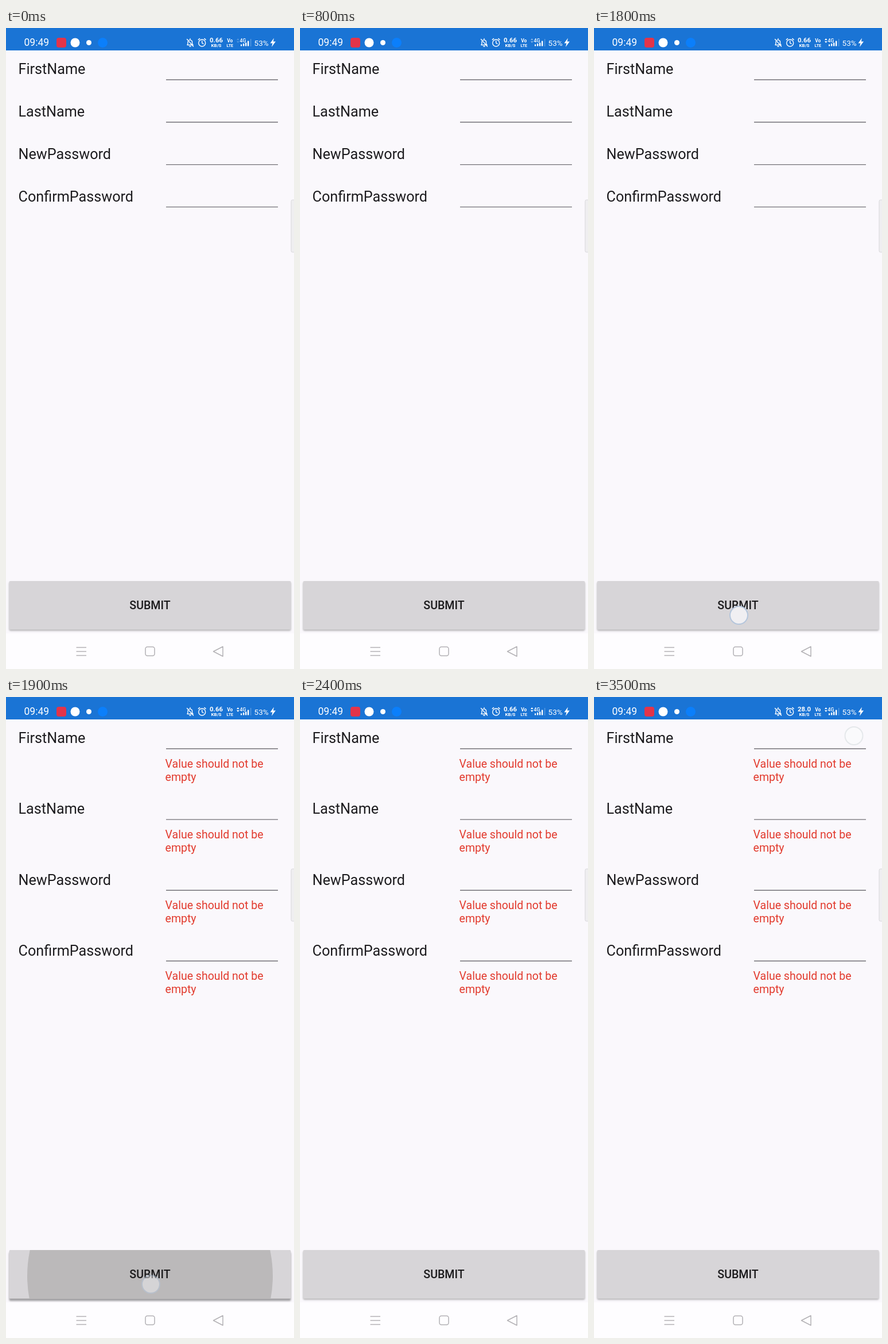
Animation of 502x1115 px, one loop 3.6 s. Source, as an HTML page:

```html
<!DOCTYPE html>
<html lang="en">
<head>
<meta charset="utf-8">
<title>Form validation</title>
<style>
  html, body { margin: 0; width: 100%; height: 100%; overflow: hidden; background: #faf8fc; }
  svg { display: block; width: 502px; height: 1115px; font-family: Roboto, "Noto Sans", sans-serif; }
  .label { font-size: 25.2px; fill: #1d1c1f; }
  .error { font-size: 19.5px; fill: #e23b2e; }
  .line { stroke: #727176; stroke-width: 1.4; }
  .white { fill: #fff; }
  .bold { font-weight: 700; text-anchor: middle; }
  .icon { fill: none; stroke: #fff; stroke-width: 1.4; stroke-linecap: round; stroke-linejoin: round; }
  .nav { fill: none; stroke: #b3b1b5; stroke-width: 1.5; stroke-linejoin: round; }
</style>
</head>
<body>
<svg viewBox="0 0 502 1115">
  <defs>
    <clipPath id="buttonClip"><rect x="5.5" y="962" width="491" height="84.5" rx="2"/></clipPath>
    <filter id="blur" x="-5%" y="-20%" width="110%" height="140%"><feGaussianBlur stdDeviation="1.8"/></filter>
  </defs>
  <rect width="502" height="1115" fill="#faf8fc"/>
  <rect y="1053" width="502" height="62" fill="#fefdff"/>

  <!-- status bar -->
  <rect width="502" height="39" fill="#1a74d5"/>
  <g class="white">
    <text x="31.5" y="31" font-size="17.5">09:49</text>
    <rect x="88" y="17" width="17" height="17" rx="4" fill="#e3344a"/>
    <circle cx="120.5" cy="25.5" r="8"/>
    <circle cx="144.5" cy="25.5" r="4.5"/>
    <circle cx="168.5" cy="25.5" r="8.5" fill="#0b7ffb"/>
    <g class="icon">
      <path d="M316 29.5h10l-1.5-2.5v-3.5a4 4 0 0 0-7.5 0V27zM319.8 32h2.4M321 18.5v1M315.5 19.5l11 12.5"/>
      <circle cx="341.7" cy="26" r="6"/>
      <path d="M341.7 22.5V26l2.3 1.6M335.3 20.4l2.4-2M348.1 20.4l-2.4-2"/>
    </g>
    <text id="speed" class="bold" x="366.5" y="25" font-size="11.4"></text>
    <text class="bold" x="366.5" y="33.2" font-size="8">KB/S</text>
    <text class="bold" x="390.3" y="24.5" font-size="8.5">Vo</text>
    <text class="bold" x="390.3" y="32.6" font-size="7">LTE</text>
    <path id="arrows" d="M404.3 18l2.3 3h-4.6zM404.3 26l2.3-3h-4.6z"/>
    <text x="407.5" y="24.8" font-size="8.6" font-weight="500">4G</text>
    <path d="M409 28.5h2.2v3h-2.2zM413 27h2.4v4.5H413zM417 25.5h2.4v6H417zM421 22.5h2.4v9H421z"/>
    <path d="M426 19h1.3v13H426z" opacity=".3"/>
    <text x="432.5" y="31.2" font-size="13.6">53%</text>
    <path d="M467 17.5l-6.5 9h4l-1.5 6.5 7-9.5h-4.2z"/>
  </g>

  <g id="form"></g>
  <rect x="497" y="299" width="8" height="91" rx="2.5" fill="#efeef0" stroke="#d9d8db"/>

  <!-- submit button -->
  <rect id="shadow" x="5.5" y="964" width="491" height="84.5" rx="2" filter="url(#blur)"/>
  <g clip-path="url(#buttonClip)">
    <rect x="5" y="962" width="492" height="85" fill="#d7d5d8"/>
    <circle id="ripple" cx="251" cy="1007" fill="#bbb9ba"/>
  </g>
  <text x="251" y="1011.4" font-size="19.6" font-weight="500" text-anchor="middle" fill="#1b1a1c">SUBMIT</text>

  <!-- navigation bar -->
  <path class="nav" d="M122.5 1077.5h17.5M122.5 1084.5h17.5M122.5 1091.5h17.5M361.5 1084.5l16.5-8.5v17z"/>
  <rect class="nav" x="243" y="1076.5" width="16" height="15.5" rx="3.5"/>

  <circle id="touch" r="15.5" stroke-width="2"/>
</svg>
<script>
const LOOP = 3600, STEP = 100;
const names = ["FirstName", "LastName", "NewPassword", "ConfirmPassword"];
const $ = id => document.getElementById(id);
const set = (id, attrs) => {
  for (const key in attrs) $(id).setAttribute(key, attrs[key]);
};

function formMarkup(invalid) {
  const gap = invalid ? 123.1 : 73.8;
  return names.map((name, i) => {
    const error = invalid
      ? `<text class="error" x="277.6" y="122.6">Value should not be</text>
         <text class="error" x="277.6" y="145.6">empty</text>` : "";
    return `<g transform="translate(0 ${i * gap})">
      <text class="label" x="21.5" y="80.4">${name}</text>
      <path class="line" d="M279 90H474"/>${error}</g>`;
  }).join("");
}

// Linear fade from 1 at start to 0 at end
const fade = (t, start, end) => Math.max(0, Math.min(1, (end - t) / (end - start)));

let shown = null;
function render(t) {
  const invalid = t >= 1900;
  if (invalid !== shown) {
    $("form").innerHTML = formMarkup(invalid);
    shown = invalid;
  }
  $("speed").textContent = t < 2900 ? "0.66" : "28.0";
  set("arrows", { opacity: t < 700 ? 0.25 : t < 1600 ? 0.45 : 1 });

  const pressed = t >= 1900 && t < 2000;
  set("shadow", { y: pressed ? 966 : 964, opacity: pressed ? 0.36 : 0.28 });
  set("ripple", {
    r: t < 1900 ? 0 : Math.min(260, 214 + (t - 1900) * 0.46),
    opacity: fade(t, 2000, 2400)
  });

  const onField = t >= 3400;
  set("touch", {
    cx: onField ? 453 : 252.5,
    cy: onField ? 67.5 : 1021.5,
    fill: onField ? "#fafafc" : "#f0eff2",
    stroke: onField ? "#e5e8eb" : "#b5c6dc",
    opacity: onField ? 1 : t < 1700 ? 0 : [1, 1, 0.5, 0.2][(t - 1700) / STEP] || 0
  });
}

function tick() {
  render(Math.floor(performance.now() % LOOP / STEP) * STEP);
  requestAnimationFrame(tick);
}
tick();
</script>
</body>
</html>
```
